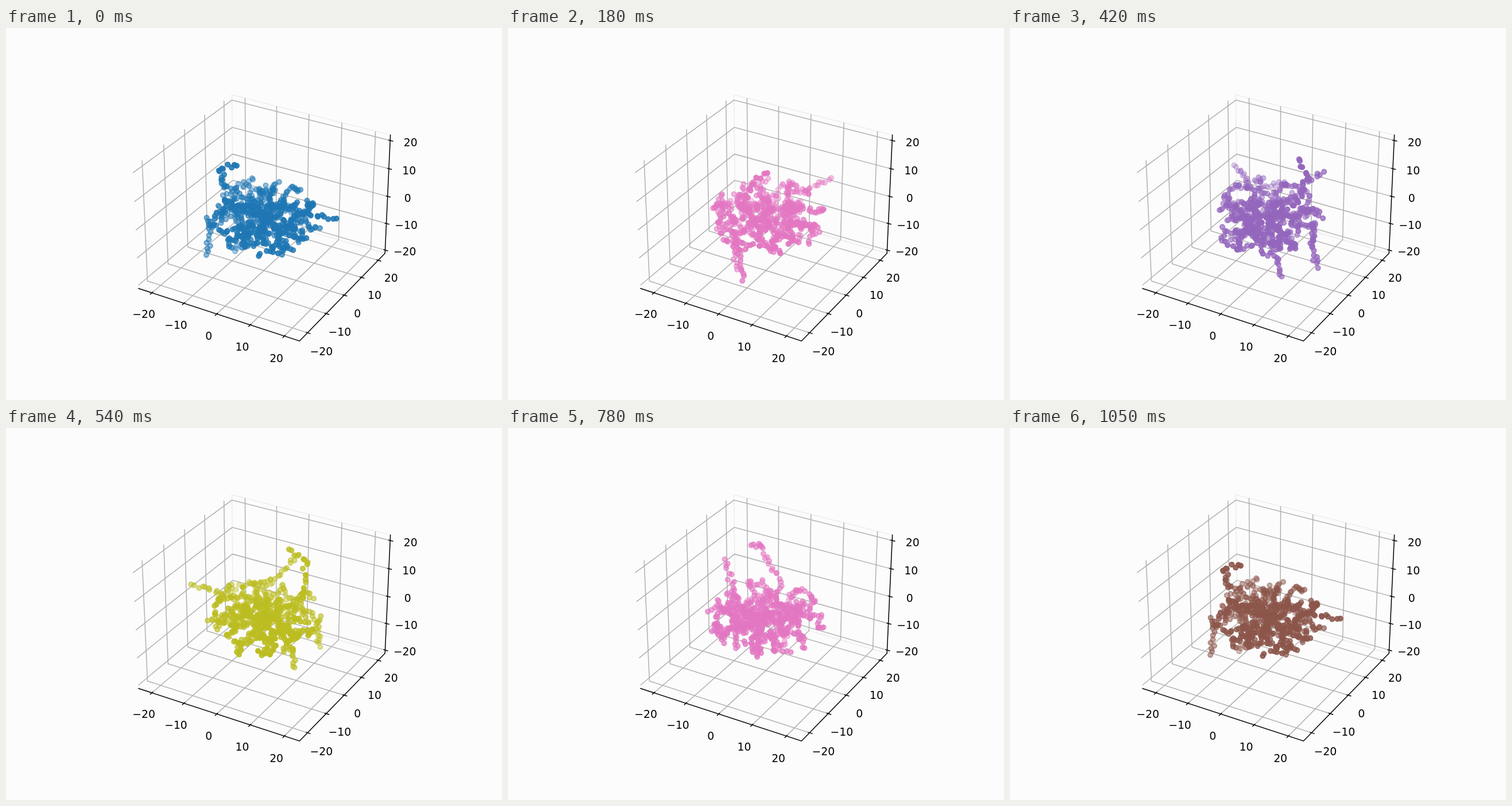
An HTML page with a canvas that plays this animation: 864 px wide and 648 px high, repeating every 1080 ms.

```html
<!DOCTYPE html>
<html lang="en">
<head>
<meta charset="utf-8">
<title>Rotating cluster</title>
<style>
  html, body { margin: 0; width: 864px; height: 648px; overflow: hidden; background: #fcfcfc; }
  svg, canvas { position: absolute; left: 0; top: 0; }
  text { font: 18.75px "DejaVu Sans", sans-serif; text-anchor: middle; }
  path { fill: none; stroke-width: 1.5; }
  .pane { stroke: #ececec; }
  .grid { stroke: #b0b0b0; }
  .axis { stroke: #000; stroke-linecap: square; }
</style>
</head>
<body>
<svg id="axes" width="864" height="648" viewBox="0 0 864 648"></svg>
<canvas id="cloud" width="864" height="648"></canvas>
<script>
const STEP_MS = 30, STEPS = 36, TURN = 2 * Math.PI;
const COLORS = ['#1f77b4', '#ff7f0e', '#2ca02c', '#d62728', '#9467bd',
                '#8c564b', '#e377c2', '#7f7f7f', '#bcbd22', '#17becf'];
const HALF = 0.59524, HALF_Z = 0.44643;   // half sizes of the plot box
const scaleX = v => 0.0245 * v - 0.0015;
const scaleY = v => 0.0246 * v;
const scaleZ = v => 0.0207 * v - 0.0073;

// Perspective camera: elevation 30 degrees, azimuth -60 degrees, distance 10.
function project([x, y, z]) {
  const right = 0.86603 * x + 0.5 * y;
  const up = -0.25 * x + 0.43301 * y + 0.86603 * z;
  const depth = 10 - (0.43301 * x - 0.75 * y + 0.5 * z);
  return [449.54 + 2697.1 * right / depth, 320.5 - 2697.1 * up / depth, depth];
}

function drawAxes() {
  const a = HALF, c = HALF_Z, out = 0.019, inn = 0.0095, gap = 0.0988, gapZ = 0.0741;
  const parts = [];
  const line = (cls, ...points) => {
    const d = points.map(p => project(p).slice(0, 2).map(v => v.toFixed(2)).join(' ')).join('L');
    parts.push(`<path class="${cls}" d="M${d}"/>`);
  };
  const label = (value, point) => {
    const [x, y] = project(point);
    const sign = value < 0 ? '\u2212' : '';
    parts.push(`<text x="${x.toFixed(1)}" y="${(y + 14.25).toFixed(1)}">${sign}${Math.abs(value)}</text>`);
  };

  line('pane', [a, a, -c], [-a, a, -c], [-a, a, c], [a, a, c]);
  for (let t = -20; t <= 20; t += 10) {
    const x = scaleX(t), y = scaleY(t), z = scaleZ(t);
    line('grid', [x, -a, -c], [x, a, -c], [x, a, c]);
    line('grid', [a, y, -c], [-a, y, -c], [-a, y, c]);
    line('grid', [-a, -a, z], [-a, a, z], [a, a, z]);
  }
  line('axis', [-a, -a, -c], [a, -a, -c], [a, a, -c], [a, a, c]);
  for (let t = -20; t <= 20; t += 10) {
    const x = scaleX(t), y = scaleY(t), z = scaleZ(t);
    line('axis', [x, -a - out, -c], [x, -a + inn, -c]);
    line('axis', [a + out, y, -c], [a - inn, y, -c]);
    line('axis', [a + out, a, z], [a - inn, a, z]);
    label(t, [x, -a - gap, -c - gapZ]);
    label(t, [a + gap, y, -c - gapZ]);
    label(t, [a + gap, a + gap, z]);
  }
  document.getElementById('axes').innerHTML = parts.join('');
}

function seededRandom(seed) {
  return () => {
    seed = (seed + 0x6D2B79F5) | 0;
    let t = Math.imul(seed ^ (seed >>> 15), 1 | seed);
    t = (t + Math.imul(t ^ (t >>> 7), 61 | t)) ^ t;
    return ((t ^ (t >>> 14)) >>> 0) / 4294967296;
  };
}

// Tips of the long arms: radius, azimuth in degrees, height.
const ARMS = [[11, 209, 10.4], [11, 220, 17], [8.1, 241, 19.4], [15.1, 259, 12.4],
              [21.1, 2, 4.8], [15.4, 215, -14.4], [9, 180, -17.3]];

// A tree of particles: each target is joined to the nearest particle by a jagged chain.
function growCluster() {
  const random = seededRandom(41);
  const spread = w => (random() - 0.5) * w;
  const distance = (p, q) => Math.hypot(p[0] - q[0], p[1] - q[1], p[2] - q[2]);
  const points = [[0, 0, 0]];

  function growTo(r, angle, z) {
    const tip = [r * Math.cos(angle), r * Math.sin(angle), z];
    const root = points.reduce((best, p) => distance(p, tip) < distance(best, tip) ? p : best);
    const count = Math.ceil(distance(root, tip) / 1.1);
    for (let i = 1; i <= count; i++) {
      const jitter = i < count ? 1.2 : 0;
      points.push(root.map((v, j) => v + (tip[j] - v) * i / count + spread(jitter)));
    }
  }

  const targets = 230;
  for (let i = 1; i <= targets; i++) {
    const reach = Math.sqrt(i / targets), h = spread(2);
    growTo(15.5 * reach * Math.sqrt(1 - h * h), random() * TURN, 10.5 * reach * h - 1.5);
  }
  for (const [r, azimuth, z] of ARMS) growTo(r, azimuth * TURN / 360, z);
  return points;
}

const cluster = growCluster();
const ctx = document.getElementById('cloud').getContext('2d');

function drawCloud(step) {
  const angle = TURN * step / (STEPS - 1);
  const cos = Math.cos(angle), sin = Math.sin(angle);
  const dots = cluster
    .map(([x, y, z]) => project([scaleX(x * cos - y * sin), scaleY(x * sin + y * cos), scaleZ(z)]))
    .sort((p, q) => q[2] - p[2]);
  const far = dots[0][2], near = dots[dots.length - 1][2];

  ctx.clearRect(0, 0, 864, 648);
  ctx.fillStyle = ctx.strokeStyle = COLORS[step % COLORS.length];
  ctx.lineWidth = 1.875;
  for (const [x, y, depth] of dots) {
    ctx.globalAlpha = 1 - 0.7 * (depth - near) / (far - near);
    ctx.beginPath();
    ctx.arc(x, y, 4.19, 0, TURN);
    ctx.fill();
    ctx.stroke();
  }
}

const start = performance.now();
let shown = -1;
function tick() {
  const step = Math.floor((performance.now() - start) / STEP_MS) % STEPS;
  if (step !== shown) drawCloud(shown = step);
  requestAnimationFrame(tick);
}

drawAxes();
tick();
</script>
</body>
</html>
```
